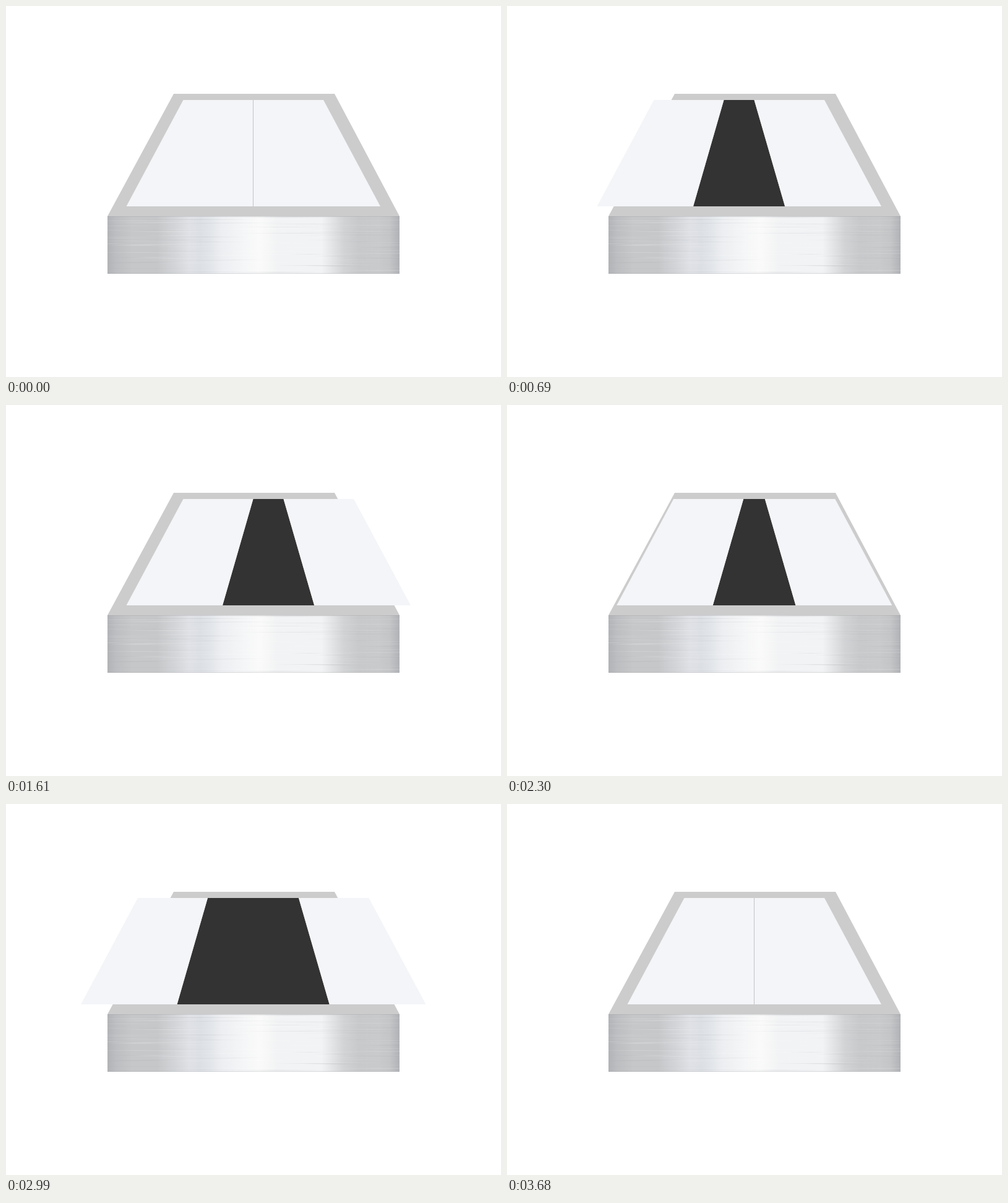
Recreate the animation shown at these times as an HTML page with a canvas. Size 800x600 px, loop 3.91 s.

```html
<!DOCTYPE html>
<html lang="en">
<head>
<meta charset="utf-8">
<title>Sliding lid box</title>
<style>
  html, body { margin: 0; width: 100%; height: 100%; overflow: hidden; background: #fff; }
  canvas { display: block; width: 800px; height: 600px; }
</style>
</head>
<body>
<canvas id="stage" width="800" height="600"></canvas>
<script>
const ctx = document.getElementById('stage').getContext('2d');
const STEP = 230;
const TOP = 152, BOTTOM = 324, MID = 399.5;

// Distance each lid slides, [left, right], one pair per step.
const slide = d => [d, d];
const POSES = [
  [0, 0], [49, 0], [133, 0], [49, 0],
  [0, 0], [0, 49], [0, 133], [0, 49],
  [0, 0], ...[8, 17.3, 73.5, 129, 73.5, 17.3, 8].map(slide), [0, 0]
];

function poly(color, points, g = ctx) {
  g.fillStyle = color;
  g.beginPath();
  points.forEach(([x, y]) => g.lineTo(x, y));
  g.closePath();
  g.fill();
}

// A trapezoid between the lid's back and front edges.
function slab(color, backL, backR, frontR, frontL) {
  poly(color, [[backL, TOP], [backR, TOP], [frontR, BOTTOM], [frontL, BOTTOM]]);
}

function seeded(seed) {
  return () => (seed = (seed * 16807) % 2147483647) / 2147483647;
}

function makeMetal(w, h) {
  const metal = document.createElement('canvas');
  metal.width = w;
  metal.height = h;
  const g = metal.getContext('2d');
  const tones = [
    [0, '#b2b3b7'], [14, '#bdbec1'], [40, '#c6c7c8'], [80, '#c6c7c9'],
    [108, '#d2d4d7'], [132, '#dfe1e6'], [150, '#dcdfe4'], [164, '#e1e4e8'],
    [184, '#eceef1'], [220, '#f5f6f7'], [246, '#fafafa'], [274, '#f2f3f4'],
    [320, '#f2f3f5'], [346, '#f2f3f4'], [360, '#e5e7e8'], [382, '#d1d3d5'],
    [406, '#c8c9cb'], [438, '#c9cacb'], [456, '#c4c5c7'], [w, '#b0b2b6']
  ];
  const base = g.createLinearGradient(0, 0, w, 0);
  tones.forEach(([x, c]) => base.addColorStop(x / w, c));
  g.fillStyle = base;
  g.fillRect(0, 0, w, h);

  // Brushed streaks, fading at both ends.
  const rnd = seeded(4711);
  for (let i = 0; i < 120; i++) {
    const len = 60 + rnd() * 180;
    const x = rnd() * (w + 80) - 80;
    const y = Math.floor(rnd() * h);
    const rgb = rnd() < 0.55 ? '255,255,255' : '150,153,160';
    const fade = g.createLinearGradient(x, 0, x + len, 0);
    fade.addColorStop(0, `rgba(${rgb},0)`);
    fade.addColorStop(0.5, `rgba(${rgb},${0.06 + rnd() * 0.14})`);
    fade.addColorStop(1, `rgba(${rgb},0)`);
    g.fillStyle = fade;
    g.fillRect(x, y, len, 1);
  }
  g.fillStyle = 'rgba(150,152,156,0.3)';
  g.fillRect(0, 0, w, 1);
  g.fillRect(0, h - 1, w, 1);
  return metal;
}

const metal = makeMetal(472, 93);

function draw([left, right]) {
  ctx.fillStyle = '#fff';
  ctx.fillRect(0, 0, 800, 600);
  poly('#ccc', [[271, 142], [531, 142], [636, 340], [164, 340]]);
  ctx.drawImage(metal, 164, 340);

  const lid = '#f4f5f8';
  if (!left && !right) {
    slab(lid, 286.5, 513, 605, 194.5);
    ctx.fillStyle = '#c3c3c4';
    ctx.fillRect(399, TOP, 1, BOTTOM - TOP);
    return;
  }
  // The resting lid gives way slightly when the other is fully open.
  const l = right > 130 ? 0.7 : left;
  const r = left > 130 ? 0.7 : right;
  slab('#333', MID - l, MID + r, 449.2 + r, 350 - l);
  slab(lid, 286.5 - left, MID - l, 350 - l, 194.5 - left);
  slab(lid, MID + r, 513 + right, 605 + right, 449.2 + r);
}

let shown = -1;
function tick() {
  const i = Math.floor(performance.now() / STEP) % POSES.length;
  if (i !== shown) draw(POSES[shown = i]);
  requestAnimationFrame(tick);
}
tick();
</script>
</body>
</html>
```
